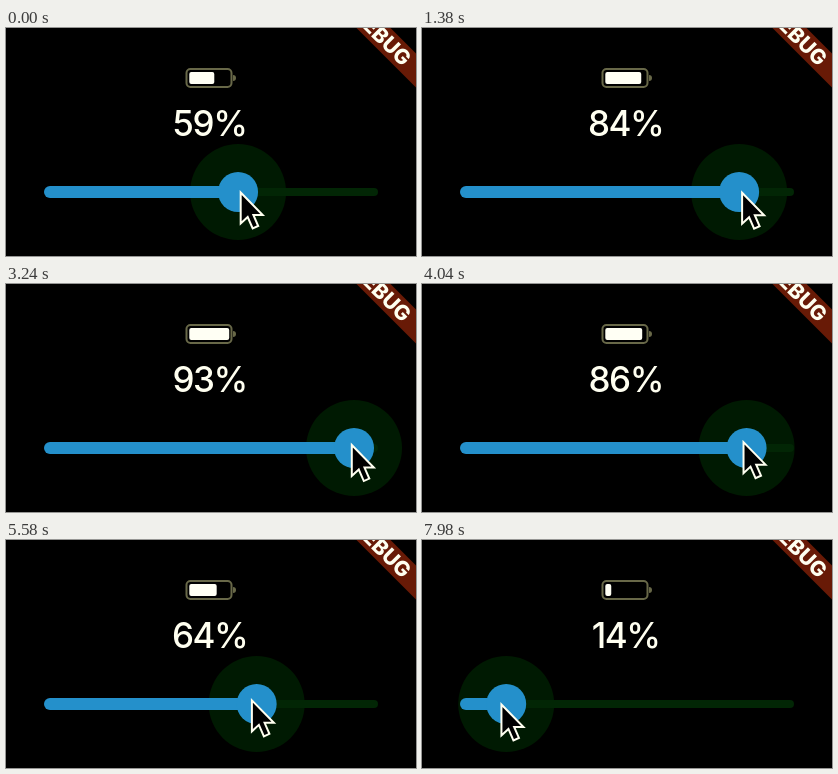
Animation of 410 by 228 pixels, one loop 8000 ms. Source, as an HTML page:

```html
<!DOCTYPE html>
<html lang="en">
<head>
<meta charset="utf-8">
<title>Battery slider</title>
<style>
  html, body { margin: 0; width: 100%; height: 100%; overflow: hidden; background: #000; }
  svg { display: block; width: 410px; height: 228px; }
  text { font-family: Inter, Roboto, sans-serif; fill: #fffff0; }
  #label { font-size: 35px; font-weight: 500; letter-spacing: -.04em; text-anchor: middle; }
  #banner { font-size: 21px; font-weight: 800; text-anchor: end; }
</style>
</head>
<body>
<svg viewBox="0 0 410 228">
  <g transform="translate(367.5 0) rotate(45)">
    <rect x="-30" y="-12" width="120" height="24" fill="#681a06"/>
    <text id="banner" x="48" y="7.5">DEBUG</text>
  </g>

  <rect x="180.5" y="41" width="45" height="18" rx="4" fill="none" stroke="#686848" stroke-width="2"/>
  <path d="M227 47a3 3 0 0 1 0 6z" fill="#686848"/>
  <rect id="charge" x="183.3" y="44" height="12" rx="2" fill="#fffff4"/>
  <text id="label" x="203.7" y="108.3"></text>

  <circle id="halo" cy="164" r="48" fill="#001a02"/>
  <rect x="42" y="160" width="330" height="8" rx="4" fill="#022605"/>
  <rect id="active" x="38" y="158" height="12" rx="6" fill="#2490cb"/>
  <circle id="thumb" cy="164" r="20" fill="#2490cb"/>
  <path id="cursor" d="M0 0V31L7 24.5L12 36L17.5 33.5L12.7 22.5H22Z"
        fill="#000" stroke="#fffff0" stroke-width="2"/>
</svg>
<script>
  const DURATION = 8000, TRACK_START = 38, TRACK_LENGTH = 334;

  // Thumb position at each whole second
  const stops = [232, 292.5, 350, 352, 326, 284, 223, 146, 83];

  const [charge, label, halo, active, thumb, cursor] =
    ['charge', 'label', 'halo', 'active', 'thumb', 'cursor'].map(id => document.getElementById(id));

  function slope(i) {
    const a = Math.max(i - 1, 0), b = Math.min(i + 1, stops.length - 1);
    return (stops[b] - stops[a]) / (b - a);
  }

  // Smooth curve through the stops, in pixels
  function thumbX(seconds) {
    const i = Math.max(0, Math.min(Math.floor(seconds), stops.length - 2));
    const u = seconds - i, v = 1 - u;
    return stops[i] + (stops[i + 1] - stops[i]) * u * u * (3 - 2 * u)
      + slope(i) * u * v * v - slope(i + 1) * u * u * v;
  }

  const bump = (t, centre, width) => Math.exp(-(((t - centre) / width) ** 2));

  function draw(seconds) {
    const x = thumbX(seconds);
    const percent = (x - TRACK_START) / TRACK_LENGTH * 100;
    label.textContent = Math.ceil(percent) + '%';
    charge.setAttribute('width', percent * 0.43);
    active.setAttribute('width', x - TRACK_START);
    halo.setAttribute('cx', x);
    thumb.setAttribute('cx', x);

    // The cursor runs ahead of the thumb and drifts vertically
    const speed = (thumbX(seconds + 0.01) - thumbX(seconds - 0.01)) / 0.02;
    const cursorX = x - 1 + speed * 0.06;
    const cursorY = 164.5 + 13 * bump(seconds, 2.05, 0.35) - 7 * bump(seconds, 4.5, 1.5);
    cursor.setAttribute('transform', `translate(${cursorX} ${cursorY})`);
  }

  const start = performance.now();
  function tick() {
    draw((performance.now() - start) % DURATION / 1000);
    requestAnimationFrame(tick);
  }
  tick();
</script>
</body>
</html>
```
